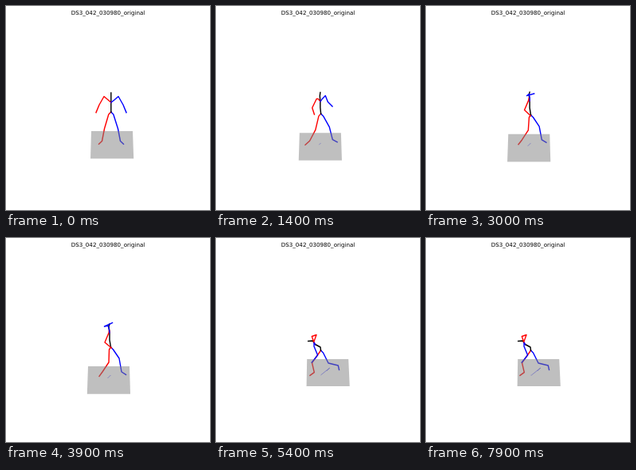
These frames come from a looping animation (256x256 px, 8 s). An HTML page:

```html
<!DOCTYPE html>
<html lang="en">
<head>
<meta charset="utf-8">
<title>Skeleton motion</title>
<style>
  html, body { margin: 0; width: 100%; height: 100%; overflow: hidden; background: #fff; }
  svg { display: block; width: 100vw; height: 100vh; }
  text { font: 7.11px "DejaVu Sans", sans-serif; text-anchor: middle; text-rendering: geometricPrecision; }
  polyline { fill: none; stroke-width: 1.42; stroke-linejoin: round; stroke-linecap: square; }
  #trail { stroke: #00f; stroke-width: .5; stroke-linecap: butt; }
  #ground { fill: #808080; fill-opacity: .5; }
</style>
</head>
<body>
<svg viewBox="0 0 256 256">
  <text x="128" y="10.5">DS3_042_030980_original</text>
  <polyline id="trail"/>
  <polyline id="rightLeg" stroke="red"/>
  <polyline id="leftLeg" stroke="blue"/>
  <polyline id="spine" stroke="black"/>
  <polyline id="rightArm" stroke="red"/>
  <polyline id="leftArm" stroke="blue"/>
  <polygon id="ground"/>
</svg>
<script>
const LOOP = 8000, STEP = 100, REACH = 3900, CROUCH = 5300, END = 7900;

const clamp = u => Math.min(1, Math.max(0, u));
const smooth = (a, b, t) => {
  const u = clamp((t - a) / (b - a));
  return u * u * (3 - 2 * u);
};
const mix = (p, q, u) => p.map((a, i) => a + (q[i] - a) * u);
const mirror = points => points.map(([x, y]) => [264 - x, y]);

// Three poses: stand (symmetric), reach up, crouch.
const standSpine = Array.from({ length: 5 }, (_, i) => [131.8, 133 - 6 * i]);
const standArm = [[123, 113.5], [117, 124], [113, 133.7]];
const standLeg = [[123.5, 154], [120.5, 169.5], [116.5, 173.3]];

const spine = {
  stand: standSpine,
  reach: [[131.5, 137], [130, 128], [130, 119], [129, 111], [130, 108]],
  crouch: [[131.5, 141], [131, 137], [124.5, 133.5], [121.5, 129], [115.7, 129.5]]
};

// step and swing bow the path outwards while reaching and crouching;
// lag delays the reach.
const rightLeg = {
  stand: standLeg, step: [-1.6, .3],
  reach: [[129, 156], [121, 168], [117, 173.5]],
  crouch: [[120.5, 156.7], [123.3, 168.7], [118, 172.5]]
};
const leftLeg = {
  stand: mirror(standLeg), step: [1, -.5],
  reach: [[142, 151], [145, 168], [150.5, 171.5]],
  crouch: [[141, 157], [153.3, 160], [154.5, 165.5]]
};
const rightArm = {
  stand: standArm, swing: [-4, 0],
  reach: [[129, 119], [124, 131], [132.5, 138]],
  crouch: [[120.3, 123.5], [126, 121.5], [122.5, 131.2]]
};
const leftArm = {
  stand: mirror(standArm), swing: [5.5, -2.5], lag: 2,
  reach: [[128, 110], [123.5, 111], [133.5, 106.5]],
  crouch: [[123, 136], [127.6, 147], [120.2, 156.2]]
};

const reachAt = t => Math.sin(Math.PI / 2 * clamp(t / REACH));
const crouchAt = t => smooth(REACH, CROUCH, t);

function pose({ stand, reach, crouch, step = [0, 0], swing = [0, 0], lag = 1 }, t) {
  const r = reachAt(t) ** lag, c = crouchAt(t);
  const stepping = Math.sin(Math.PI * r), swinging = Math.sin(Math.PI * c);
  return stand.map((p, i) => mix(mix(p, reach[i], r), crouch[i], c).map(
    (v, k) => v + (i + 1) * (step[k] * stepping + swing[k] * swinging)));
}

// Ground shift; the camera follows the root.
const shift = t => {
  const r = reachAt(t), c = crouchAt(t);
  return [-4 * r + 11.2 * c + smooth(CROUCH, END, t), 4 * r - 9 * c];
};

const put = (id, points) =>
  document.getElementById(id).setAttribute("points", points.map(p => p.map(v => v.toFixed(2))).join(" "));

function draw(now) {
  const t = Math.floor(now % LOOP / STEP) * STEP;
  const back = pose(spine, t);
  const [root, , chest, neck] = back;
  const collar = mix(chest, neck, .5);
  const spread = 1 - reachAt(t) ** 2;
  const beside = ([x, y], dx, dy = 0) => [x + dx, y + dy];

  put("spine", back);
  put("rightLeg", [root, beside(root, -2 - spread, 3), ...pose(rightLeg, t)]);
  put("leftLeg", [root, beside(root, 3, 3), ...pose(leftLeg, t)]);
  put("rightArm", [chest, beside(collar, -3.5 * spread), ...pose(rightArm, t)]);
  put("leftArm", [chest, beside(collar, 4 * spread), ...pose(leftArm, t)]);

  const [x, y] = shift(t);
  put("ground", [[107 + x, 157 + y], [159 + x, 157 + y],
    [160.2 + x * 1.05, 191.5 + y * 1.08], [106 + x * 1.05, 191.5 + y * 1.08]]);

  // Past root positions, projected on the ground.
  const trail = [];
  for (let s = 0; s <= t; s += STEP) {
    const [px, py] = shift(s);
    trail.push([131.5 + x - px, 172 + y - py]);
  }
  put("trail", trail);
}

function tick() {
  draw(performance.now());
  requestAnimationFrame(tick);
}
tick();
</script>
</body>
</html>
```
